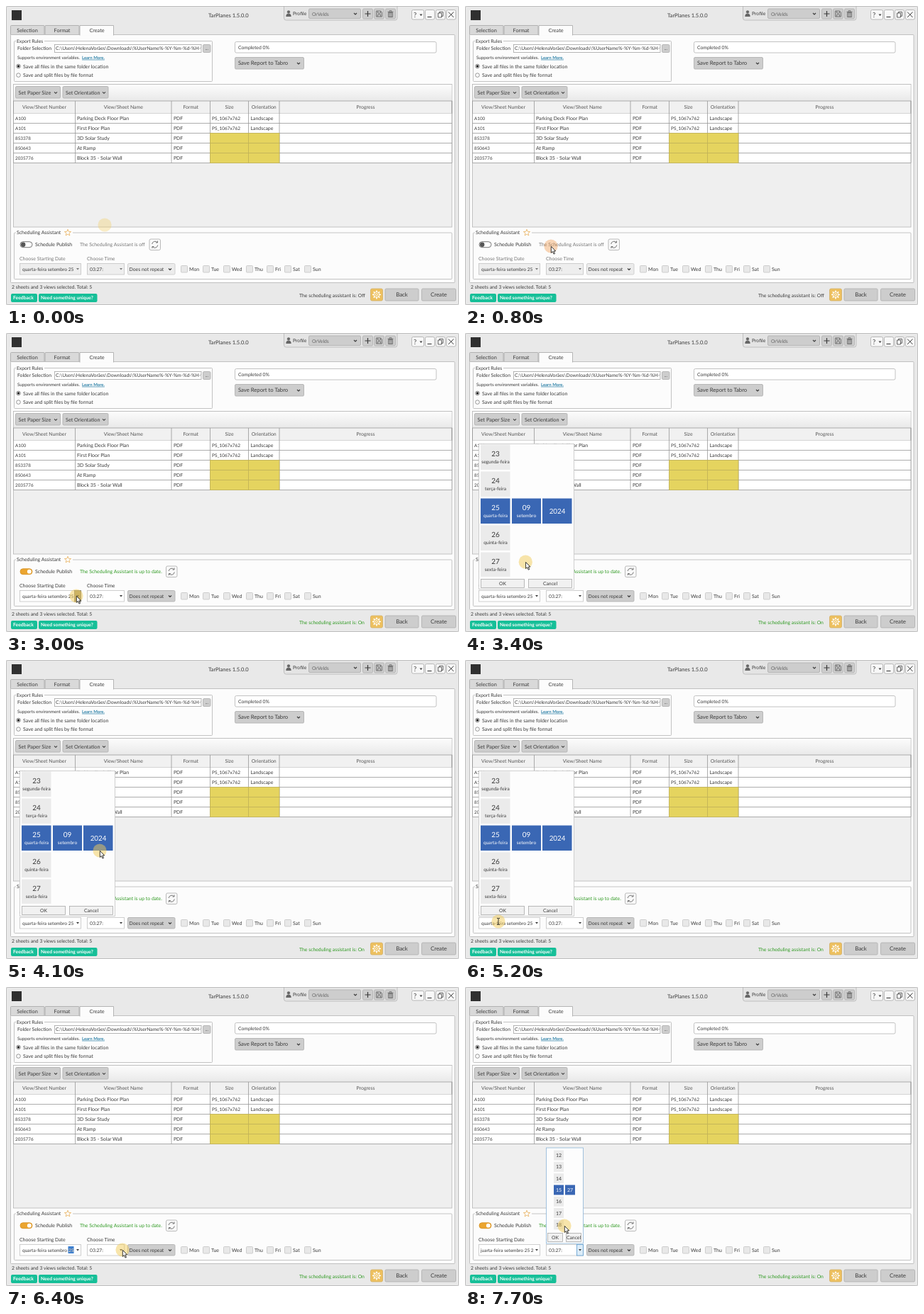
An HTML page for the animation above (8 s loop, 638 by 422 pixels).

```html
<!DOCTYPE html>
<html lang="en">
<head>
<meta charset="utf-8">
<title>Scheduling assistant</title>
<style>
  html, body { margin: 0; width: 100%; height: 100%; overflow: hidden; background: #e9e9e9; }
  svg { display: block; width: 638px; height: 422px; }
  text { font-family: Lato, "Open Sans", sans-serif; text-rendering: geometricPrecision; white-space: pre; }
</style>
</head>
<body>
<svg id="stage" viewBox="0 0 638 422" xmlns="http://www.w3.org/2000/svg"></svg>
<script>
const INK = '#3a3a3a', SOFT = '#666', LINE = '#b4b4b4', BLUE = '#3a67b4', GREEN = '#2f9a22', GOLD = '#e5d45f';

const text = (x, y, str, size = 7, fill = INK, extra = '') =>
  `<text x="${x}" y="${y}" font-size="${size}" fill="${fill}" ${extra}>${str}</text>`;
const centered = (x, y, str, size = 7, fill = INK) => text(x, y, str, size, fill, 'text-anchor="middle"');
const box = (x, y, w, h, fill, stroke = 'none', radius = 0) =>
  `<rect x="${x}" y="${y}" width="${w}" height="${h}" fill="${fill}" stroke="${stroke}" stroke-width=".8" rx="${radius}"/>`;
const path = (d, stroke = INK, width = 1, fill = 'none') =>
  `<path d="${d}" fill="${fill}" stroke="${stroke}" stroke-width="${width}"/>`;
const circle = (x, y, r, fill, stroke = 'none') =>
  `<circle cx="${x}" cy="${y}" r="${r}" fill="${fill}" stroke="${stroke}" stroke-width=".9"/>`;
const group = (id, body) => `<g id="${id}">${body}</g>`;
const chevron = (x, y) => path(`M${x - 2} ${y - 1}l2 2 2-2`, INK, 1.1);
const arrow = (x, y, fill = INK) => path(`M${x - 2} ${y - 1}h4l-2 2.6z`, 'none', 0, fill);
const button = (x, y, w, h, fill = '#cdcdcd', stroke = '#adadad') =>
  box(x + .5, y + .5, w - 1, h - 1, fill, stroke, 1.5);

function titleBar() {
  const tools = [502, 518, 534].map(x => button(x, 3.5, 15, 15)).join('');
  const windowKeys = [[571, 17], [590, 13], [605, 13], [620, 13]]
    .map(([x, w]) => box(x + .5, 5.5, w, 13.5, '#f8f8f8', '#aaa', 2)).join('');
  return box(8, 6, 14, 14, '#303030') +
    text(285, 15.5, 'TarPlanes 1.5.0.0', 7.6) +
    path('M391.5 0V17q0 3 3 3H548q3 0 3-3V0', '#b4b4b4', .8, '#e4e4e4') +
    circle(398, 8.3, 2.1, SOFT) + path('M394.3 15q0-4.6 3.7-4.6t3.7 4.6z', 'none', 0, SOFT) +
    text(404, 13, 'Profile', 6.8) +
    button(426, 3.5, 74, 14.5) + text(431, 13.5, 'OrVelds', 6.8, SOFT) + chevron(492, 11) + tools +
    path('M505.5 11h8M509.5 7v8', INK, 1.2) +
    path('M521.5 7h6l2 2v6h-8zM523.5 7v3h4V7M523.5 15v-3h4v3', SOFT, .9) +
    path('M537.5 8.3h8M540 8V6.8h3V8M538.5 9.5v6h6v-6zM540.4 10v5M542.6 10v5', SOFT, .9) +
    windowKeys + text(574, 15.5, '?', 9.5) + arrow(584.5, 12.5) +
    path('M593.5 15.5h6', INK, 1.1) +
    path('M608.5 10h5v6h-5zM610.5 10V8.3h5v6h-2', INK, .8) +
    path('M623 8.5l7.5 7.5M630.5 8.5l-7.5 7.5', INK, 1);
}

function tabs() {
  return box(6.5, 27.5, 47.5, 13.5, '#d9d9d9', '#a5a5a5', 1) + box(55, 27.5, 48, 13.5, '#d9d9d9', '#a5a5a5', 1) +
    box(6.5, 40.5, 625.5, 350, '#fcfcfc', LINE, 1) +
    path('M104 41.5V27.5H151.5V41.5', '#a5a5a5', .8, '#fcfcfc') +
    centered(30, 36.7, 'Selection', 7.3) + centered(79, 36.7, 'Format', 7.3) + centered(128, 36.7, 'Create', 7.3);
}

function exportRules() {
  return box(11.5, 49.5, 279, 57, 'none', LINE, 1) + box(14, 46, 40, 7, '#fcfcfc') +
    text(15, 52, 'Export Rules', 6.7) + text(16, 62, 'Folder Selection', 6.8) +
    box(68.5, 54.5, 206.5, 11, '#fff', '#a5a5a5') +
    '<clipPath id="folder"><path d="M69 54h205.5v12H69z"/></clipPath>' +
    text(70, 62.2, 'C:\\Users\\HelenaVorães\\Downloads\\%UserName%-%Y-%m-%d-%H-%M', 6.8, INK, 'clip-path="url(#folder)"') +
    button(277, 54, 11.5, 12) + centered(282.8, 61.5, '...', 6) +
    text(16, 74.7, 'Supports environment variables.', 6.25) +
    text(107, 74.7, 'Learn More.', 6, '#17749e', 'font-weight="600" text-decoration="underline"') +
    circle(17.5, 85, 2.8, '#fff', '#777') + circle(17.5, 85, 1.7, '#222') + circle(17.5, 97.6, 2.8, '#fff', '#888') +
    text(24, 87.5, 'Save all files in the same folder location') +
    text(24, 100, 'Save and split files by file format') +
    box(322.5, 50.5, 283.5, 15.5, '#fff', LINE, 2) + text(327, 61, 'Completed 0%', 6.8) +
    button(322, 72, 98, 17.5) + text(327, 83.3, 'Save Report to Tabro', 7.7) + chevron(412, 81);
}

function table() {
  const edges = [10.5, 97.5, 233, 287.5, 341.5, 385, 628];
  const heads = ['View/Sheet Number', 'View/Sheet Name', 'Format', 'Size', 'Orientation', 'Progress'];
  const rows = [['A100', 'Parking Deck Floor Plan'], ['A101', 'First Floor Plan'], ['853378', '3D Solar Study'],
    ['850643', 'At Ramp'], ['2035776', 'Block 35 - Solar Wall']];
  const rowTop = i => Math.floor(151 + i * 14.1) + .5;
  const bottom = rowTop(rows.length);
  let cells = '', marks = '';
  rows.forEach(([number, name], i) => {
    const y = rowTop(i), next = rowTop(i + 1), base = y + 9.2;
    cells += path(`M10.5 ${next}H628`, '#999', .8) +
      text(13, base, number, 6.3) + text(100, base, name) + text(236, base, 'PDF', 6.8);
    if (i < 2) cells += text(290, base, 'PS_1067x762', 6.5) + text(344.5, base, 'Landscape', 6.9);
    else marks += [3, 4].map(c => box(edges[c], y, edges[c + 1] - edges[c], next - y, GOLD, '#c3b457')).join('');
  });
  return `<linearGradient id="fade" x2="0" y2="1"><stop stop-color="#fcfcfc"/><stop offset="1" stop-color="#e9e9e9"/></linearGradient>` +
    box(10.5, 110.5, 617.5, 201.5, '#efefef', LINE) + box(11, 111, 616.5, 22.5, 'url(#fade)') +
    button(13, 113, 64, 17.5) + text(17.5, 124.6, 'Set Paper Size', 7.4) + chevron(70, 122.3) +
    button(79.5, 113, 65, 17.5) + text(84, 124.6, 'Set Orientation', 7.2) + chevron(138, 122.3) +
    box(10.5, 134, 617.5, 17.5, '#f1f1f1', '#999') + box(10.5, 151.5, 617.5, bottom - 151.5, '#fff') +
    heads.map((name, i) => centered((edges[i] + edges[i + 1]) / 2, 144.8, name, 6.9, '#555')).join('') +
    cells + edges.map(x => path(`M${x} 134V${bottom}`, '#999', .8)).join('') + marks;
}

const refresh = x => box(x - 7.5, 329, 15.5, 15.5, '#f9f9f9', '#aaa', 2) +
  path(`M${x - 3.8} 336a4.2 4.2 0 0 1 7.3-2.4M${x + 4.2} 337.5a4.2 4.2 0 0 1-7.3 2.4M${x + 4} 331.5v2.5h-2.5M${x - 3.6} 342v-2.5h2.5`, SOFT, .9);

function schedule(on) {
  const ink = on ? INK : '#777', field = on ? '#fff' : '#eee';
  const status = on ? GREEN : '#777';
  return box(20, 332.7, 17, 8, on ? '#eba52f' : '#fff', on ? '#d58f20' : '#555', 4) +
    circle(on ? 32.8 : 24.2, 336.7, on ? 2.9 : 3.2, on ? '#fff' : '#555') +
    text(104, 339.3, `The Scheduling Assistant is ${on ? 'up to date.' : 'off'}`, 6.9, status) +
    refresh(on ? 233 : 209.5) +
    text(19, 358.6, 'Choose Starting Date', 6.9, ink) + text(114, 358.6, 'Choose Time', 6.9, ink) +
    box(19.5, 363.5, 86, 15.5, field, '#c4c4c4') + arrow(101, 371, ink) +
    box(114.5, 363.5, 52, 15.5, field, '#c4c4c4') + arrow(162, 371, ink) + text(118, 373.6, '03:27:', 6.7) +
    button(171, 363, 67.5, 16.5, on ? '#cdcdcd' : '#ececec', on ? '#adadad' : '#c8c8c8') +
    text(173.5, 373.6, 'Does not repeat', 6.9) + chevron(231, 371.5) +
    text(413, 411, `The scheduling assistant is: ${on ? 'On' : 'Off'}`, 6.85, on ? GREEN : INK);
}

function assistant() {
  const days = { Mon: 246, Tue: 277, Wed: 306, Thu: 338, Fri: 367, Sat: 392, Sun: 420 };
  const star = Array.from({ length: 10 }, (_, i) => {
    const a = i * Math.PI / 5 - Math.PI / 2, r = i % 2 ? 2.1 : 4.8;
    return `${87 + r * Math.cos(a)} ${320 + r * Math.sin(a)}`;
  }).join('L');
  return box(11.5, 320, 616.5, 65.5, 'none', LINE, 1) + box(14, 316, 80, 9, '#fcfcfc') +
    text(15, 322.3, 'Scheduling Assistant', 6.95) + path(`M${star}z`, '#e9b05c', .8) +
    text(41, 339.3, 'Schedule Publish', 7.05) +
    group('off', schedule(false)) + group('on', schedule(true)) +
    Object.entries(days).map(([day, x]) =>
      box(x + .5, 366.5, 9, 9.5, '#e8e8e8', '#c4c4c4', 1) + text(x + 12, 373.6, day, 7)).join('');
}

function dateField() {
  return group('dateArrow', box(96.5, 363.5, 9, 15.5, '#a99a6c', '#777') + arrow(101, 371)) +
    group('selection', box(87.5, 366, 8, 10, '#3b7fd0')) +
    group('date', text(23, 373.6, 'quarta-feira setembro 25', 6.6)) +
    group('selected', text(88, 373.6, '25', 6.4, '#fff')) +
    group('dateEdited', text(22, 373.6, 'juarta-feira setembro 25 2', 6.5)) +
    group('timeArrow', box(157.5, 363.5, 9, 15.5, '#dcecf8', '#5a9bd0') + arrow(162, 371));
}

function footer() {
  const teeth = Array.from({ length: 8 }, (_, i) =>
    `<path d="M522 401.4v2.6" stroke="#fff" stroke-width="1.5" transform="rotate(${i * 45} 522 407.4)"/>`).join('');
  const pill = (x, w, str, size) => box(x, 406, w, 12, '#16bf98', 'none', 2) +
    text(x + 3, 414.3, str, size, '#fff', 'font-weight="700"');
  return text(8, 399, '2 sheets and 3 views selected. Total: 5', 6.8) +
    pill(7, 37, 'Feedback', 6.8) + pill(46, 82.5, 'Need something unique?', 6.7) +
    box(513.5, 399, 17, 17, '#edc05f', '#d2b067', 2) + teeth +
    circle(522, 407.4, 3.9, 'none', '#fff') + circle(522, 407.4, 1.6, 'none', '#fff') +
    button(533.5, 398.5, 48, 18) + centered(557.5, 410.3, 'Back', 7.9) +
    button(585, 398.5, 49, 18) + centered(609.5, 410.3, 'Create', 7.9);
}

const popupButton = (x, w, str) => box(x + .5, 347.5, w - 1, 12, '#f1f1f1', '#aaa') +
  centered(x + w / 2, 356.2, str, 6.8);

function datePopup() {
  const names = ['segunda', 'terça', 'quarta', 'quinta', 'sexta'];
  let out = box(19.5, 156.5, 134, 205, '#fdfdfd', '#c4c4c4');
  names.forEach((name, i) => {
    const y = 157.5 + i * 38, chosen = i === 2, ink = chosen ? '#fff' : INK;
    out += box(22, y, 41.5, i === 4 ? 34.5 : 35.5, chosen ? BLUE : '#ebebeb') +
      centered(43, y + 16.8, 23 + i, 10, ink) + centered(43, y + 26.6, `${name}-feira`, 6.6, ink);
  });
  return out + box(66, 233.5, 41, 35.5, BLUE) + box(109, 233.5, 41.5, 35.5, BLUE) +
    centered(86.5, 250.3, '09', 10, '#fff') + centered(86.5, 260.1, 'setembro', 6.6, '#fff') +
    centered(130, 254.8, '2024', 9.8, '#fff') + popupButton(22, 62, 'OK') + popupButton(89, 62, 'Cancel');
}

function timePopup() {
  let out = box(114.5, 227, 52, 135, '#fdfdfd', '#8bb4d6');
  for (let i = 0; i < 7; i++) {
    const y = 237.5 + i * 16.3, chosen = i === 3;
    out += box(125, y - 7, 14, 14, chosen ? BLUE : '#ebebeb') + centered(132, y + 2.5, 12 + i, 7, chosen ? '#fff' : INK);
  }
  return out + box(141, 279.4, 14, 14, BLUE) + centered(148, 288.9, '27', 7, '#fff') +
    popupButton(116, 22, 'OK') + popupButton(142, 22, 'Cancel');
}

const pointer = group('pointer',
  group('halo', circle(0, 0, 9.6, 'currentColor')) +
  group('arrowShape', path('M.3.3V9.4l2.1-1.9 1.6 3.6 1.5-.7-1.6-3.5h2.8z', '#222', .9, '#fff')) +
  group('beam', path('M-2-4.5h1.3l.7.6.7-.6H2M0-4V4M-2 4.5h1.3l.7-.6.7.6H2', '#222', .9)));

const stage = document.getElementById('stage');
stage.innerHTML = box(0, 0, 638, 422, '#e9e9e9') + titleBar() + tabs() + exportRules() + table() + assistant() +
  dateField() + footer() + group('datePopup', datePopup()) + group('timePopup', timePopup()) +
  box(.5, .5, 637, 421, 'none', '#b4b4b4', 2) + pointer;

// Pointer stops: time in ms, x, y
const route = [[0, 139, 309], [800, 121, 339], [1300, 121, 339], [1600, 28, 337], [1900, 28, 337],
  [2200, 99, 371], [3200, 99, 371], [3700, 60, 235], [4100, 132, 269], [4300, 132, 269],
  [4700, 73, 325], [4900, 73, 325], [5200, 47, 369], [5500, 53, 354], [5900, 53, 354],
  [6300, 164, 371], [7300, 164, 371], [7700, 140, 337], [8000, 140, 337]];

// Half-open time spans in which each part is visible
const shown = {
  off: [0, 1800], on: [1800, 8000], dateArrow: [2300, 3300], datePopup: [3300, 6000],
  selection: [6000, 6800], selected: [6000, 6800], date: [0, 7400], dateEdited: [7400, 8000],
  timeArrow: [7400, 8000], timePopup: [7400, 8000], arrowShape: [100, 8000], beam: [5100, 5400]
};
const clicks = [[700, 1000], [1700, 1900], [5800, 6000]];
const within = (t, [from, to]) => t >= from && t < to;
const parts = Object.fromEntries([...stage.querySelectorAll('[id]')].map(el => [el.id, el]));

function pointerAt(t) {
  const i = route.findIndex(stop => stop[0] > t);
  const [t0, x0, y0] = route[i - 1], [t1, x1, y1] = route[i];
  const p = (t - t0) / (t1 - t0), e = p * p * (3 - 2 * p);
  return [x0 + (x1 - x0) * e, y0 + (y1 - y0) * e];
}

function draw(t) {
  for (const id in shown) parts[id].style.display = within(t, shown[id]) ? '' : 'none';
  if (within(t, shown.beam)) parts.arrowShape.style.display = 'none';
  const pressed = clicks.some(span => within(t, span));
  parts.halo.style.color = pressed ? '#f0984c' : '#f2cc58';
  parts.halo.style.opacity = pressed ? .4 : Math.min(.5, .33 + t / 2000);
  parts.pointer.setAttribute('transform', `translate(${pointerAt(t).join(' ')})`);
}

const start = performance.now();
function tick() {
  draw(Math.floor((performance.now() - start) / 100) * 100 % 8000);
  requestAnimationFrame(tick);
}
tick();
</script>
</body>
</html>
```
